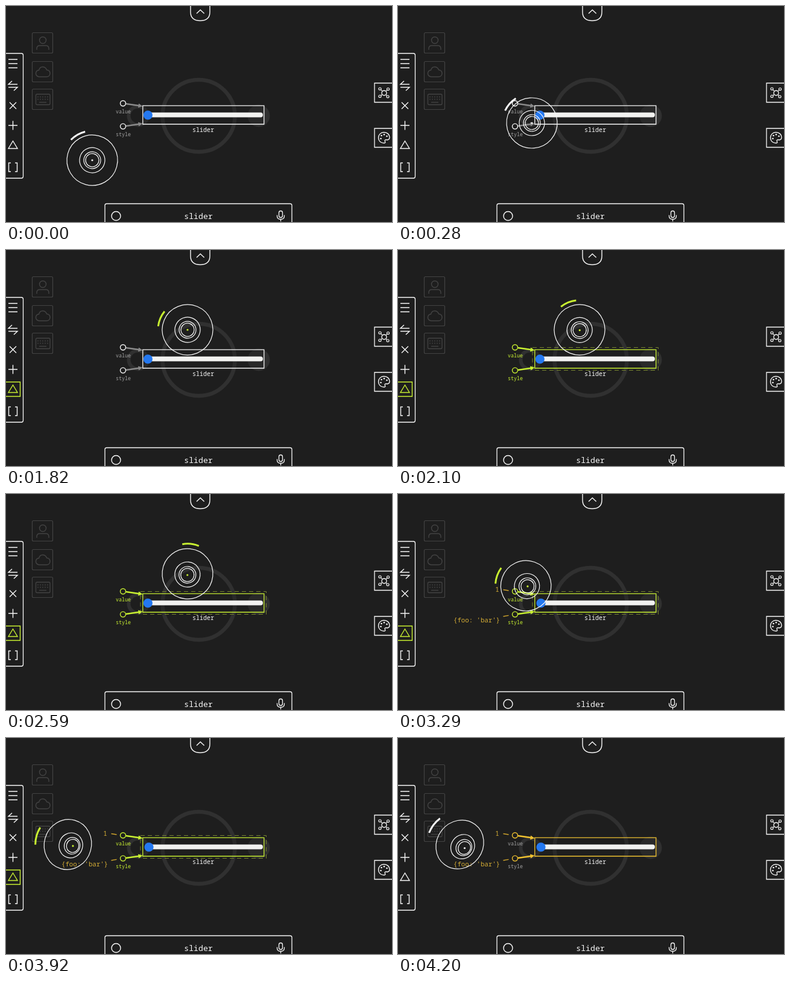
Recreate the animation shown at these times as an HTML page with a canvas. Size 640 by 360 pixels, loop 4270 ms.

```html
<!DOCTYPE html>
<html lang="en">
<head>
<meta charset="utf-8">
<title>Slider node</title>
<style>
html, body { margin: 0; width: 100%; height: 100%; overflow: hidden; background: #1e1e1e; }
canvas { display: block; width: 640px; height: 360px; }
</style>
</head>
<body>
<canvas id="stage"></canvas>
<script>
const canvas = document.getElementById('stage');
const ctx = canvas.getContext('2d');
const dpr = window.devicePixelRatio || 1;
canvas.width = 640 * dpr;
canvas.height = 360 * dpr;

const LOOP = 4270, STEP = 70;
const BG = '#1e1e1e', WHITE = '#f8f8f8', LIME = '#c8f031', GOLD = '#f0c230';
const DIM = '#434343', SHADE = '#303030', GREY = '#8a8a8a';
const MONO = '"Noto Sans Mono", "DejaVu Sans Mono", monospace';

// Moments when the state switches
const TOOL_ON = 1120, SELECT = 2100, VALUES = 2800, TOOL_OFF = 3990;

// Keys: [time, value], eased between neighbours
const dialX = [[70, 143], [490, 301], [3150, 301], [3451, 102.5]];
const dialY = [[70, 257], [490, 133], [3150, 133], [3451, 177.5]];
const arcDeg = [[70, 240], [490, 202], [1785, 202], [2310, 272], [2590, 276], [3010, 284],
  [3150, 284], [3290, 200], [3570, 181], [3710, 182], [4200, 217]];
const tiltAmt = [[1785, 0], [2590, 2], [3150, 2], [3290, 3], [3570, 8], [3710, 8], [4200, 10]];

function track(keys, t) {
  if (t <= keys[0][0]) return keys[0][1];
  for (let i = 1; i < keys.length; i++) {
    const [t0, a] = keys[i - 1], [t1, b] = keys[i];
    if (t < t1) {
      const p = (t - t0) / (t1 - t0);
      return a + (b - a) * p * p * (3 - 2 * p);
    }
  }
  return keys[keys.length - 1][1];
}

function stroke(color, width) {
  ctx.strokeStyle = color;
  ctx.lineWidth = width;
  ctx.stroke();
}

function fill(color) {
  ctx.fillStyle = color;
  ctx.fill();
}

function path(d, color = WHITE, width = 1.4) {
  ctx.strokeStyle = color;
  ctx.lineWidth = width;
  ctx.stroke(new Path2D(d));
}

function circle(x, y, r) {
  ctx.beginPath();
  ctx.arc(x, y, r, 0, Math.PI * 2);
}

function ring(x, y, r, color = WHITE, width = 1.4) {
  circle(x, y, r);
  stroke(color, width);
}

function dot(x, y, r, color = WHITE) {
  circle(x, y, r);
  fill(color);
}

function box(x, y, w, h, r, color = WHITE, width = 1.3) {
  ctx.beginPath();
  ctx.roundRect(x, y, w, h, r);
  stroke(color, width);
}

function label(text, x, y, size, color) {
  ctx.font = size + 'px ' + MONO;
  ctx.textAlign = 'center';
  ctx.fillStyle = color;
  ctx.fillText(text, x, y);
}

function backdrop() {
  ctx.fillStyle = BG;
  ctx.fillRect(0, 0, 640, 360);
  ring(319.5, 183, 60, SHADE, 6.5);
  ring(219, 183, 15.5, SHADE, 6);
  dot(419, 183, 18.5, SHADE);
}

function dimIcons() {
  for (const y of [44.5, 92.5, 138.5]) box(43.5, y, 34, 34, 2, DIM, 1.2);
  ring(61, 57, 5.5, DIM);
  path('M51 73V71Q51 66 56 66H66Q71 66 71 71V73', DIM);
  path('M55 118Q49 117 49.5 111.5Q50.5 107 54.5 107Q56 101 61.5 101.5Q66 102 67.5 106.5Q73 107 73 112.5Q72.5 118 67 118Z', DIM);
  box(49.5, 147, 23.5, 17.5, 2, DIM);
  for (let i = 0; i < 5; i++) {
    dot(53 + i * 4, 151.5, 0.9, DIM);
    dot(53 + i * 4, 155.5, 0.9, DIM);
  }
  path('M55 160.5H67', DIM, 1.3);
}

function toolbar(active) {
  box(-6, 79, 34.5, 208, 3);
  path('M4 89H19M4 96H19M4 103H19');
  path('M19 130.5H4L10 125M4 135.5H19L13 141');
  path('M6 160.5L17 171.5M17 160.5L6 171.5');
  path('M4 199H19M11.5 191.5V206.5');
  path('M8 261.5H4.5V276H8M15 261.5H18.5V276H15');
  if (active) box(-4, 220, 27.5, 24, 0, LIME, 1.4);
  path('M11.5 225L19 237.5H4Z', active ? LIME : WHITE);
}

function topTab() {
  path('M306 -2V10Q306 24.5 322 24.5Q338 24.5 338 10V-2');
  path('M316 12.5L322.3 6.5L328.6 12.5');
}

function rightButtons() {
  box(611, 128.5, 40, 32, 0);
  box(611, 204, 40, 31.5, 0);
  ring(627, 145, 4);
  for (const [x, y] of [[620, 138], [633.5, 138.5], [633, 151], [620, 150.5]]) {
    const a = Math.atan2(y - 145, x - 627), c = Math.cos(a), s = Math.sin(a);
    ring(x, y, 2, WHITE, 1.2);
    path(`M${627 + 4 * c} ${145 + 4 * s}L${x - 2 * c} ${y - 2 * s}`, WHITE, 1.2);
  }
  path('M626.5 210.5C632 210.5 636 214 636 219C636 223 632.5 223.5 630.5 223C628.5 222.5 627.5 224 628.5 226C629.5 228 628 228.5 626.5 228.5C621 228.5 617.5 224.5 617.5 219.5C617.5 214.5 621.5 210.5 626.5 210.5Z');
  for (const [x, y] of [[621.5, 221], [622.5, 216], [627, 214.3], [631.5, 217]]) dot(x, y, 1.3);
}

function searchBar() {
  box(164, 329.5, 310, 40, 3);
  ring(182.5, 350, 7.5);
  label('slider', 319, 355, 13.2, WHITE);
  box(452.5, 341.5, 6, 11, 3);
  path('M449.5 348.5V350Q449.5 355.5 455.5 355.5Q461.5 355.5 461.5 350V348.5M455.5 355.5V359', WHITE, 1.3);
}

function link(x0, y0, x1, y1, color) {
  const a = Math.atan2(y1 - y0, x1 - x0);
  ctx.save();
  ctx.translate(x1, y1);
  ctx.rotate(a);
  ctx.beginPath();
  ctx.moveTo(-Math.hypot(x1 - x0, y1 - y0), 0);
  ctx.lineTo(-5, 0);
  stroke(color, 2.6);
  ctx.beginPath();
  ctx.moveTo(0, 0);
  ctx.lineTo(-7, -3.6);
  ctx.lineTo(-7, 3.6);
  ctx.closePath();
  fill(color);
  ctx.restore();
}

function node(selected, filled) {
  const main = selected ? LIME : filled ? GOLD : WHITE;
  const wire = selected ? LIME : filled ? GOLD : GREY;
  const text = selected ? LIME : '#a0a0a0';
  ctx.fillStyle = 'rgba(30,30,30,0.35)';
  ctx.fillRect(227, 166, 201, 31);

  ctx.beginPath();
  ctx.roundRect(230, 177.5, 196, 8, 4);
  fill('#f2f2f0');
  dot(filled ? 237 : 235.3, 181.8, 7.6, '#2478f0');
  box(226.8, 166.2, 201, 30.8, 0, main, 1.3);
  if (selected) {
    ctx.setLineDash([7, 5]);
    box(223, 162.5, 208.5, 38, 0, '#75822f', 1);
    ctx.setLineDash([]);
  }
  label('slider', 327, 209.5, 10, WHITE);

  link(199, 163, 226.5, 167, wire);
  link(199, 200, 226.5, 196, wire);
  ring(194, 162.2, 4.5, main);
  ring(194, 200.6, 4.5, main);
  label('value', 194.5, 178.5, 8.4, text);
  label('style', 194.5, 216.5, 8.4, text);

  if (filled) {
    label('1', 164.5, 162.5, 10.7, '#d5ad35');
    label("{foo: 'bar'}", 130.5, 214, 10.7, '#d5ad35');
    path('M174.5 159.5L183.5 161M174.5 204L183.5 202.3', '#d0a52c', 1.3);
  }
}

function dial(t, active) {
  const x = track(dialX, t), y = track(dialY, t);
  const a = track(arcDeg, t) * Math.PI / 180;
  const m = track(tiltAmt, t);
  const squash = Math.sqrt(1 - (m / 24) ** 2);
  const accent = active ? LIME : WHITE;

  // Each ring floats at its own height, so tilting shifts it
  for (const [r, h] of [[42, 0], [21, 0.6], [14, 0.85], [11, 0.95]]) {
    ctx.beginPath();
    ctx.ellipse(x - Math.cos(a) * m * h, y - Math.sin(a) * m * h, r * squash, r, a, 0, Math.PI * 2);
    stroke(WHITE, 1.2);
  }
  dot(x - Math.cos(a) * m, y - Math.sin(a) * m, 1.6, accent);

  ctx.beginPath();
  ctx.arc(x, y, 49 + m * 0.55, a - 0.28, a + 0.28);
  stroke(accent, 3);
}

function draw(t) {
  ctx.setTransform(dpr, 0, 0, dpr, 0, 0);
  ctx.lineJoin = 'miter';
  const active = t >= TOOL_ON && t < TOOL_OFF;
  backdrop();
  dimIcons();
  toolbar(active);
  topTab();
  rightButtons();
  searchBar();
  node(active && t >= SELECT, t >= VALUES);
  dial(t, active);
}

const start = performance.now();
function tick() {
  const t = (performance.now() - start) % LOOP;
  draw(Math.floor(t / STEP) * STEP);
  requestAnimationFrame(tick);
}
tick();
</script>
</body>
</html>
```
